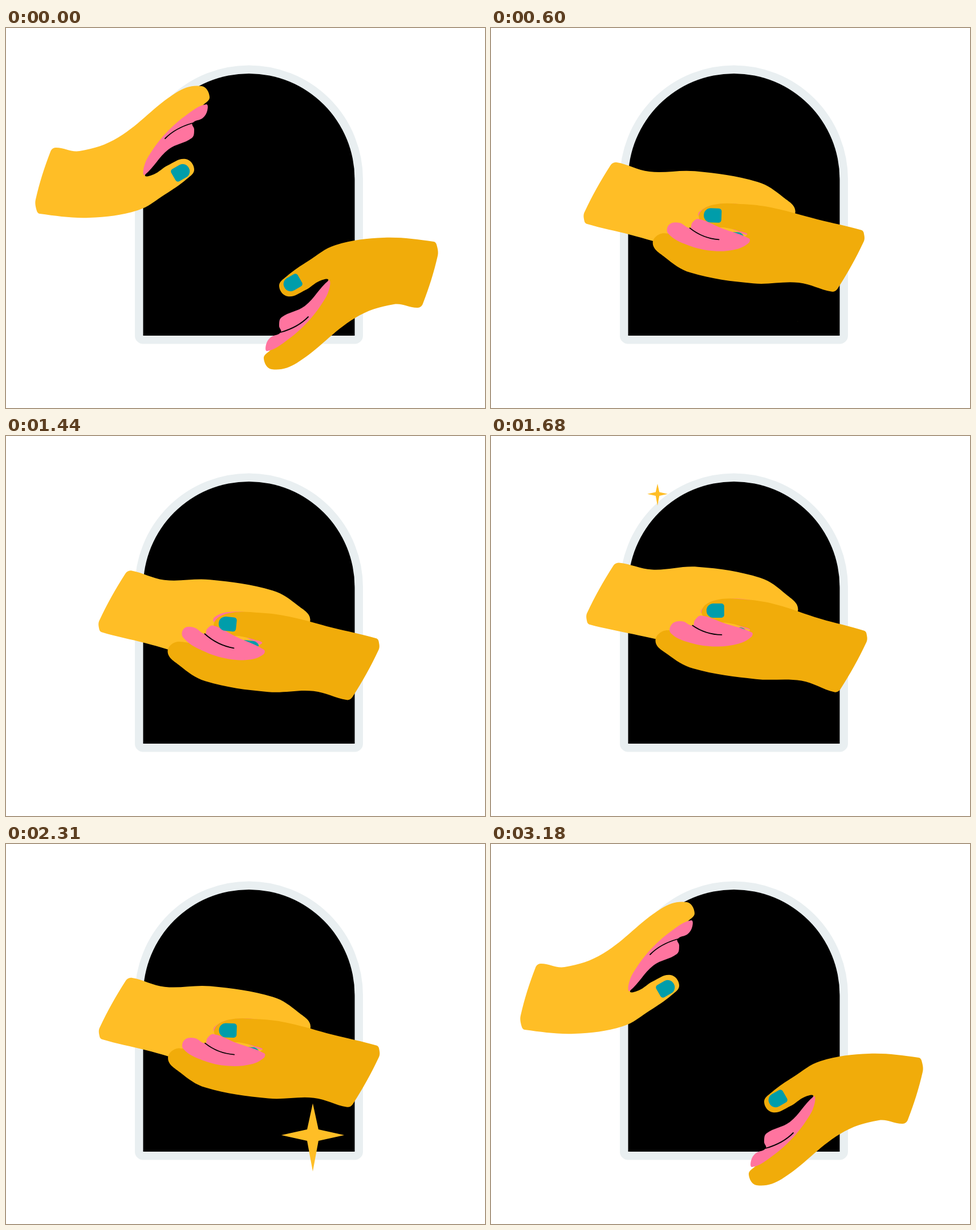
An HTML page with a canvas that plays this animation: 840x667 px, repeating every 3510 ms.

```html
<!DOCTYPE html>
<html lang="en">
<head>
<meta charset="utf-8">
<title>Handshake</title>
<style>
html, body { margin: 0; width: 100%; height: 100%; overflow: hidden; background: #fff; }
canvas { display: block; }
</style>
</head>
<body>
<canvas id="stage" width="840" height="667"></canvas>
<script>
const ctx = document.getElementById('stage').getContext('2d');
const LOOP = 3510, STEP = 30, LAST = 3180;
const CLOSING = 600, SHAKE = 580, SHAKE_TIME = 1731, OPENING = 2355, OPEN_TIME = 810;
const LIGHT = '#ffbe26', DARK = '#f1ac0a', PINK = '#ff749f', TEAL = '#009daa';

// Key points of the right hand, reaching out and clasped.
const PALM = {
  open: [663,368, 578,381, 530,409, 492,436, 479,453, 494,471, 525,460, 550,444, 565,443,
    530,500, 463,566, 452,580, 466,599, 510,588, 612,509, 680,485, 722,491, 731,484,
    757,400, 755,380, 750,375],
  shut: [573,335, 497,315, 445,308, 390,309, 365,327, 380,346, 410,349, 435,355, 449,362,
    400,382, 305,359, 284,376, 305,401, 350,428, 460,447, 540,446, 598,462, 608,457,
    654,374, 654,359, 650,354]
};
const FINGERS = {
  open: [566,443, 524,488, 483,508, 479,523, 482,534, 464,543, 456,556, 458,567,
    489,551, 529,516, 559,476, 568,453],
  shut: [453,368, 405,350, 364,334, 353,341, 349,350, 331,341, 313,344, 311,360,
    345,380, 390,390, 430,387, 452,376]
};
const CREASE = { open: [482,534, 509,523, 530,507], shut: [349,350, 373,364, 400,370] };
const NAIL = { open: [502,448], shut: [389,327.5] };
const MIRROR = { open: [809,701], shut: [818,697] };

const clamp = x => Math.min(1, Math.max(0, x));
const ease = x => (1 - Math.cos(Math.PI * clamp(x))) / 2;
const lerp = (a, b, k) => a + (b - a) * k;

// How far the hands are closed, how low the shake is, how much the fingers curl.
function motion(t) {
  const a = 6 * Math.PI * clamp((t - SHAKE) / SHAKE_TIME);
  const grip = clamp((t - SHAKE) / 120);
  return {
    close: t < OPENING ? ease(t / CLOSING) : 1 - ease((t - OPENING) / OPEN_TIME),
    dip: grip * Math.sin(a),
    curl: grip * (0.3 * (1 - Math.cos(a)) + 0.7 * Math.sin(a))
  };
}

// Points of a part on the way from open to shut; bow carries them outward in an arc.
function points({ open, shut }, close, bow = 0) {
  const mix = open.map((v, i) => lerp(v, shut[i], close));
  const crotch = lerp(565, 449, close), arc = bow * 4 * close * (1 - close);
  const pts = [];
  for (let i = 0; i < mix.length; i += 2)
    pts.push([mix[i] - arc * Math.max(0, crotch - mix[i]), mix[i + 1]]);
  return pts;
}

// Smooth closed curve whose handles scale with the length of each segment.
function blob(pts, color) {
  const n = pts.length, at = i => pts[(i + n) % n];
  const tangent = i => {
    const [ax, ay] = at(i - 1), [bx, by] = at(i + 1);
    const len = Math.hypot(bx - ax, by - ay) || 1;
    return [(bx - ax) / len, (by - ay) / len];
  };
  ctx.beginPath();
  ctx.moveTo(...pts[0]);
  for (let i = 0; i < n; i++) {
    const [ax, ay] = at(i), [bx, by] = at(i + 1);
    const [ux, uy] = tangent(i), [vx, vy] = tangent(i + 1);
    const h = Math.hypot(bx - ax, by - ay) * 0.36;
    ctx.bezierCurveTo(ax + ux * h, ay + uy * h, bx - vx * h, by - vy * h, bx, by);
  }
  ctx.fillStyle = color;
  ctx.fill();
}

function hand({ close, dip, curl }, color, mirrored) {
  const [[sumX, sumY]] = points(MIRROR, close);
  // Turn the left hand around, then sink with the shake, most in the middle.
  const place = ([x, y]) => {
    if (mirrored) [x, y] = [sumX - x, sumY - y];
    const sag = 16 * Math.max(0, Math.cos((x - 409) / 122));
    return [x - 8 * dip, y + dip * (22 + sag)];
  };
  const bend = ([x, y]) => place([x, y + 0.15 * curl * (x - 400)]);

  blob(points(PALM, close, 0.06).map(place), color);
  blob(points(FINGERS, close, 0.17).map(bend), PINK);

  const [a, b, c] = points(CREASE, close, 0.17).map(bend);
  ctx.beginPath();
  ctx.moveTo(...a);
  ctx.quadraticCurveTo(2 * b[0] - (a[0] + c[0]) / 2, 2 * b[1] - (a[1] + c[1]) / 2, ...c);
  ctx.strokeStyle = '#000';
  ctx.lineWidth = 1.8;
  ctx.lineCap = 'round';
  ctx.stroke();

  const [nail] = points(NAIL, close, 0.06);
  const angle = lerp(-30, 2, close) + 6 * curl;
  ctx.save();
  ctx.translate(...place(nail));
  ctx.rotate(angle * Math.PI / 180 + (mirrored ? Math.PI : 0));
  ctx.beginPath();
  ctx.roundRect(-15.5, -12.5, 31, 25, [12, 5, 5, 12]);
  ctx.fillStyle = TEAL;
  ctx.fill();
  ctx.restore();
}

function arch() {
  ctx.beginPath();
  ctx.moveTo(240.5, 540);
  ctx.arc(426, 265.5, 185.5, Math.PI, 0);
  ctx.lineTo(611.5, 540);
  ctx.closePath();
  ctx.strokeStyle = '#e9eff1';
  ctx.lineWidth = 29;
  ctx.lineJoin = 'round';
  ctx.stroke();
  ctx.fillStyle = '#000';
  ctx.fill();
}

function star(x, y, age) {
  const k = 1.015 * Math.sin(Math.PI * clamp(age / 510)) ** 2;
  if (k < 0.001) return;
  ctx.save();
  ctx.translate(x, y);
  ctx.scale(k, k);
  ctx.beginPath();
  for (const side of [1, -1]) {
    ctx.lineTo(0, -60 * side);
    ctx.lineTo(10 * side, -4 - 10 * side);
    ctx.lineTo(55.5 * side, -4);
    ctx.lineTo(10 * side, -4 + 10 * side);
  }
  ctx.fillStyle = LIGHT;
  ctx.fill();
  ctx.restore();
}

function draw(now) {
  const t = Math.min(LAST, Math.floor(now % LOOP / STEP) * STEP);
  const pose = motion(t);
  ctx.fillStyle = '#fff';
  ctx.fillRect(0, 0, 840, 667);
  arch();
  hand(pose, LIGHT, true);
  hand(pose, DARK, false);
  for (const start of [585, 2032]) star(538, 515, t - start);
  for (const start of [840, 1583]) star(292, 103, t - start);
}

const begin = performance.now();
function tick() {
  draw(performance.now() - begin);
  requestAnimationFrame(tick);
}
tick();
</script>
</body>
</html>
```
